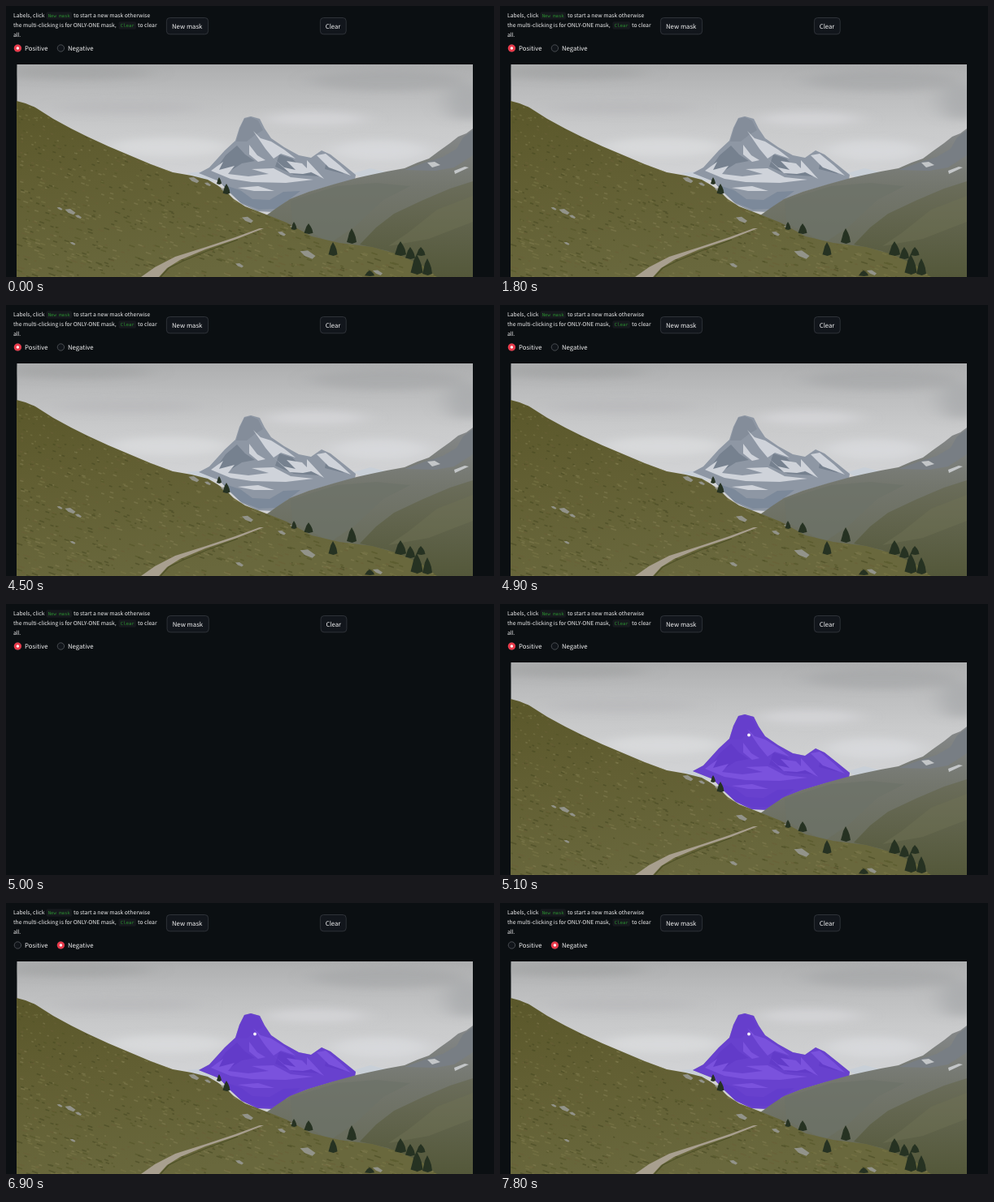
Recreate the animation shown at these times as an HTML page. Size 600x334 px, loop 8 s.

```html
<!DOCTYPE html>
<html lang="en">
<head>
<meta charset="utf-8">
<title>Mask labelling</title>
<style>
html, body { margin: 0; width: 100%; height: 100%; overflow: hidden; background: #0b0f12; }
svg { display: block; width: 100vw; height: 100vh; }
text { font-family: "Noto Sans CJK JP", "Noto Sans CJK SC", "Noto Sans CJK", "Open Sans", sans-serif; font-size: 7.76px; fill: #f1f1f2; text-rendering: geometricPrecision; white-space: pre; }
.small text { font-size: 6.79px; }
.small .code { font: 5.6px "DejaVu Sans Mono", monospace; fill: #2a8c30; }
.small rect { fill: #16191d; }
.button rect { fill: #12161c; stroke: #363a40; stroke-width: .8; }
.ring { fill: #11151a; stroke: #565a5f; stroke-width: .8; }
.on { fill: #e8394a; }
.dot { fill: #fff; }
</style>
</head>
<body>
<svg viewBox="0 0 600 334" preserveAspectRatio="none">
  <defs>
    <linearGradient id="sky" x2="0" y2="1">
      <stop offset="0" stop-color="#adaeaf"/><stop offset=".14" stop-color="#bcbdbe"/>
      <stop offset=".3" stop-color="#c9cacb"/><stop offset=".52" stop-color="#d2d3d5"/>
    </linearGradient>
    <linearGradient id="hill" x2=".35" y2="1">
      <stop offset="0" stop-color="#5a572a"/><stop offset=".45" stop-color="#625f33"/>
      <stop offset="1" stop-color="#69683d"/>
    </linearGradient>
    <linearGradient id="valley" x2="0" y2="1">
      <stop offset="0" stop-color="#85888a"/><stop offset=".4" stop-color="#73766d"/>
      <stop offset="1" stop-color="#646853"/>
    </linearGradient>
    <linearGradient id="slope" x2="0" y2="1">
      <stop offset="0" stop-color="#6b6d5b"/><stop offset="1" stop-color="#54583a"/>
    </linearGradient>
    <filter id="soft" x="-30%" y="-80%" width="160%" height="260%"><feGaussianBlur stdDeviation="14 5"/></filter>
    <clipPath id="frame"><path d="M13.5 72H574V334H13.5Z"/></clipPath>
    <path id="meadow" d="M13 117L24 120 36 125 58 139 80 151 100 161 126 173 152 184 178 195 205 205 228 209 248 214 260 221 271 229 280 238 294 247 320 257 345 267 376 284 410 292 450 297 482 306 512 320 530 334H13Z"/>
    <clipPath id="meadowClip"><use href="#meadow"/></clipPath>
    <path id="peak" d="M237 206L250 199 260 188 269 178 282 166 287 150 293 138 301 136 312 139 318 151 326 163 342 174 360 184 375 187 388 178 399 183 414 195 430 208 429 214 400 221 370 230 346 240 330 254 309 253 290 244 276 231 262 216Z"/>
  </defs>

  <g id="photo" clip-path="url(#frame)">
    <path d="M13 72H575V334H13Z" fill="url(#sky)"/>
    <g filter="url(#soft)">
      <ellipse cx="90" cy="82" rx="90" ry="9" fill="#9c9d9e" opacity=".5"/>
      <ellipse cx="470" cy="92" rx="95" ry="13" fill="#a0a1a3" opacity=".5"/>
      <ellipse cx="150" cy="125" rx="90" ry="8" fill="#b5b6b8" opacity=".5"/>
      <ellipse cx="380" cy="139" rx="65" ry="9" fill="#dddddf" opacity=".6"/>
      <ellipse cx="200" cy="174" rx="75" ry="12" fill="#dddee0" opacity=".7"/>
      <ellipse cx="567" cy="118" rx="26" ry="23" fill="#a4a6a9" opacity=".7"/>
      <ellipse cx="460" cy="178" rx="60" ry="13" fill="#dcdde0" opacity=".7"/>
    </g>
    <path d="M222 206L240 204 258 214 250 218ZM427 206L448 200 468 205 445 216Z" fill="#c9d0d8"/>
    <use href="#peak" fill="#8e97a4"/>
    <path d="M293 139L301 137 310 141 316 153 306 159 296 167 283 167 288 150Z" fill="#848d9a"/>
    <path d="M270 184L284 172 294 183 306 191 290 194 276 203 257 203ZM336 183L352 188 365 201 387 210 354 208 331 198ZM394 190L416 207 392 201Z" fill="#76818f"/>
    <path d="M304 154L313 163 326 167 342 177 356 188 338 182 329 188 319 176ZM299 171L309 184 319 190 310 192 299 183ZM252 203L267 192 262 202 281 197 273 207 298 210 323 207 302 201 329 200 350 211 378 214 344 218 302 217 276 213ZM329 188L342 199 356 202 345 191 364 194 375 205 365 207 349 206ZM382 184L393 182 410 196 424 209 397 199ZM285 224L310 222 330 228 305 228ZM370 190L383 204 391 213 370 202Z" fill="#cfd3da"/>
    <path d="M266 220L288 227 303 238 324 239 341 229 362 228 333 250 311 251 288 242Z" fill="#7c899a"/>
    <g id="mask">
      <use href="#peak" fill="#5a20e0" opacity=".72"/>
      <circle cx="306" cy="161.5" r="1.9" fill="#f5f0ff"/>
    </g>
    <path d="M320 258L334 248 349 238 372 229 402 220 431 212 449 208 468 204 490 200 506 193 520 188 532 179 546 169 556 161 566 157 574 151V334H320Z" fill="url(#valley)"/>
    <path d="M574 153L562 162 554 176 537 186 515 193 490 202 528 203 551 199 574 184Z" fill="#787e84"/>
    <path d="M518 193L527 192 534 196 524 199ZM551 203L564 198 569 199 552 207Z" fill="#c3c6c8"/>
    <path d="M350 240L407 222 455 218 497 222 464 239 430 271 399 292 352 267Z" fill="#6d7269" opacity=".7"/>
    <path d="M574 216L546 225 513 239 477 256 455 273 435 294 470 302 530 334H574Z" fill="url(#slope)"/>
    <path d="M574 234L530 251 495 279 470 296 520 287 574 266Z" fill="#707155" opacity=".45"/>
    <use href="#meadow" fill="url(#hill)"/>
    <g id="grass" clip-path="url(#meadowClip)"></g>
    <path d="M166 334L183 322 208 309 246 297 282 285 312 274 317 274 284 287 245 300 214 313 198 323 188 334Z" fill="#a89f8f"/>
    <path d="M190 334L200 323 216 315 247 302 285 288" fill="none" stroke="#4e5128" stroke-width="1.2"/>
    <g id="rocks" fill="#92938a"></g>
    <g id="trees" fill="#263222"></g>
  </g>

  <g class="small">
    <rect x="49.5" y="7.3" width="31.5" height="9.4" rx="2"/>
    <rect x="138.5" y="19.3" width="21.5" height="9.4" rx="2"/>
    <text x="9" y="14">Labels, click</text>
    <text x="51.7" y="14" class="code">New mask</text>
    <text x="83" y="14">to start a new mask otherwise</text>
    <text x="9" y="26">the multi-clicking is for ONLY-ONE mask,</text>
    <text x="140.8" y="26" class="code">Clear</text>
    <text x="162" y="26">to clear</text>
    <text x="9" y="38">all.</text>
  </g>
  <g class="button" id="buttons">
    <rect x="197.4" y="14.5" width="51.2" height="20.3" rx="4"/>
    <text x="204" y="27.6">New mask</text>
    <rect x="386.4" y="14.5" width="31.8" height="20.3" rx="4"/>
    <text x="392.7" y="27.6">Clear</text>
  </g>
  <circle class="ring" cx="14.4" cy="52" r="4.2"/>
  <circle class="ring" cx="67.4" cy="52" r="4.2"/>
  <g id="choice">
    <circle class="on" cx="14.4" cy="52" r="4.6"/>
    <circle class="dot" cx="14.4" cy="52" r="1.7"/>
  </g>
  <text x="23" y="55">Positive</text>
  <text x="76" y="55">Negative</text>
</svg>
<script>
const $ = id => document.getElementById(id);
const path = (parent, attrs) => {
  const el = document.createElementNS("http://www.w3.org/2000/svg", "path");
  for (const key in attrs) el.setAttribute(key, attrs[key]);
  parent.append(el);
};

let seed = 29;
const random = () => (seed = seed * 16807 % 2147483647) / 2147483647;

// Grass tufts grow larger towards the viewer.
const greens = ["#454821", "#535527", "#7b7748", "#837f52", "#6b6038"];
for (const color of greens) {
  let d = "";
  for (let i = 0; i < 320; i++) {
    const x = 13 + random() * 515, y = 116 + random() * 218;
    const size = 1 + (y - 100) / 60 * random();
    d += `M${x.toFixed(1)} ${y.toFixed(1)}l${(size * 1.8).toFixed(1)} ${(size * .6).toFixed(1)}`;
  }
  path($("grass"), { d, stroke: color, "stroke-width": 1.6, opacity: .55, fill: "none" });
}

const rocks = [[66, 250, 7], [79, 254, 13], [89, 260, 8], [82, 293, 7], [231, 215, 13], [248, 220, 8],
  [268, 227, 8], [297, 264, 14], [339, 281, 10], [353, 273, 8], [371, 307, 19], [287, 320, 10], [457, 329, 12]];
for (const [x, y, w] of rocks)
  path($("rocks"), { d: `M${x - w / 2} ${y - w * .25}l${w * .5} ${-w * .05} ${w * .5} ${w * .35} ${-w * .2} ${w * .2} ${-w * .5} ${-w * .2}Z` });

const trees = [[425, 293, 19, 12], [485, 308, 18, 14], [497, 312, 15, 12], [510, 308, 11, 11], [505, 331, 25, 15],
  [518, 332, 21, 12], [372, 281, 13, 11], [402, 308, 17, 11], [354, 276, 10, 7], [262, 220, 9, 6], [271, 232, 13, 9], [447, 333, 7, 12]];
for (const [x, y, h, w] of trees)
  path($("trees"), { d: `M${x} ${y - h}l${w * .25} ${h * .3} ${w * .15} ${h * .25} ${w * .1} ${h * .35} ${-w * .45} ${h * .1} ${-w * .55} ${-h * .1} ${w * .15} ${-h * .35} ${w * .1} ${-h * .25}Z` });

// The image blinks once while it is replaced by the masked one.
const LOOP = 8000;
const steps = [
  { at: 0, photo: true, mask: false, negative: false },
  { at: 5000, photo: false, mask: false, negative: false },
  { at: 5100, photo: true, mask: true, negative: false },
  { at: 6600, photo: true, mask: true, negative: true },
];
const show = (id, visible) => $(id).setAttribute("display", visible ? "inline" : "none");
const start = performance.now();

function draw() {
  const time = (performance.now() - start) % LOOP;
  const step = steps.findLast(s => s.at <= time);
  show("photo", step.photo);
  show("mask", step.mask);
  $("choice").setAttribute("transform", `translate(${step.negative ? 53 : 0})`);
  $("buttons").setAttribute("transform", `translate(${step.photo ? 0 : .7})`);
  requestAnimationFrame(draw);
}
draw();
</script>
</body>
</html>
```
